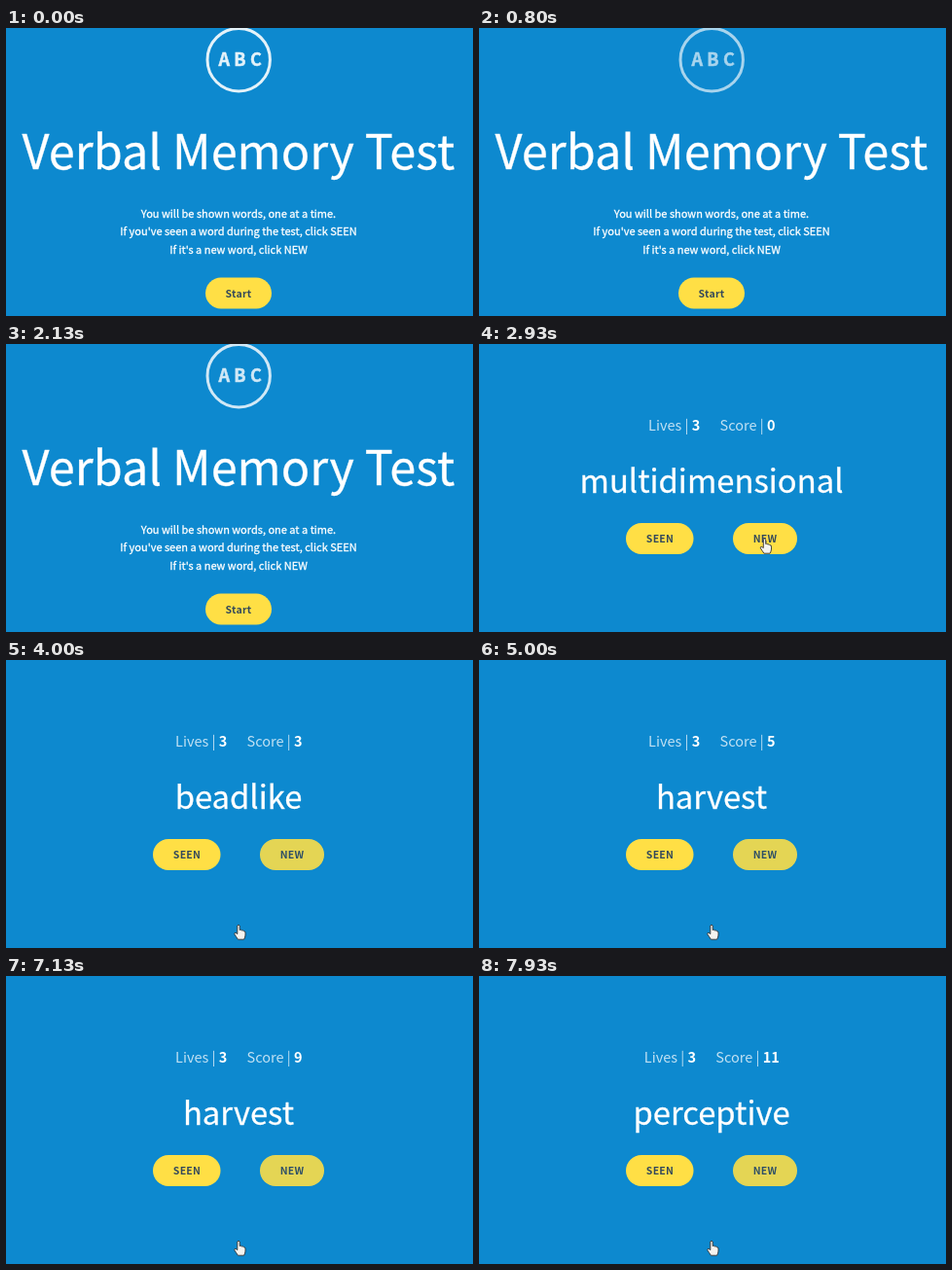
Animation of 480 by 296 pixels, one loop 8 s. Source, as an HTML page:

```html
<!DOCTYPE html>
<html lang="en">
<head>
<meta charset="utf-8">
<title>Verbal Memory Test</title>
<style>
  html, body { margin: 0; width: 100%; height: 100%; overflow: hidden; background: #0d89cf; }
  svg { display: block; width: 480px; height: 296px; }
  text {
    font-family: "Noto Sans CJK JP", "Noto Sans CJK SC", "Noto Sans CJK", "Open Sans", sans-serif;
    fill: #fff; stroke: #fff; stroke-width: 0; text-anchor: middle; white-space: pre;
  }
  .title { font-size: 48.7px; stroke-width: .3px; }
  .line { font-size: 11px; stroke-width: .3px; }
  .word { font-size: 32.8px; stroke-width: .3px; }
  .stats { font-size: 14.5px; font-weight: 300; fill-opacity: .75; }
  .stats .num { font-weight: 700; fill-opacity: 1; }
  .icon text { font-size: 18px; font-weight: 700; stroke-width: .5px; }
  .icon circle { fill: none; stroke: #fff; stroke-width: 3; }
  .btn rect { fill: #ffdf45; }
  .btn text { font-size: 10.5px; letter-spacing: .25px; font-weight: 700; fill: #34495a; }
</style>
</head>
<body>
<svg viewBox="0 0 480 296">
  <rect width="480" height="296" fill="#0d89cf"/>
  <g id="intro">
    <g class="icon" id="icon">
      <circle cx="239.2" cy="32.7" r="32.2"/>
      <text x="224.2" y="39.3">A</text>
      <text x="240.5" y="39.3">B</text>
      <text x="256.8" y="39.3">C</text>
    </g>
    <text class="title" x="239" y="144.5">Verbal Memory Test</text>
    <text class="line" x="239" y="195">You will be shown words, one at a time.</text>
    <text class="line" x="239" y="213">If you've seen a word during the test, click SEEN</text>
    <text class="line" x="239" y="231.5">If it's a new word, click NEW</text>
    <g class="btn">
      <rect x="205" y="256.5" width="68" height="32" rx="16"/>
      <text x="239" y="276.5">Start</text>
    </g>
  </g>
  <g id="game">
    <text class="stats" x="239.3" y="89">Lives | <tspan class="num">3</tspan><tspan dx="20.3">Score | </tspan><tspan class="num" id="score">0</tspan></text>
    <text class="word" id="word" x="239" y="152.8"></text>
    <g class="btn" id="seen">
      <rect x="151" y="184" width="69.5" height="32" rx="16"/>
      <text x="186" y="204.2">SEEN</text>
    </g>
    <g class="btn" id="fresh">
      <rect x="261" y="184" width="66" height="32" rx="16"/>
      <text x="294" y="204.2">NEW</text>
    </g>
  </g>
  <path id="hand" fill="#f4f4f0" stroke="#333" stroke-width=".9" stroke-linejoin="round"
    d="M-1.2 1Q0-.8 1.2 1V5.5Q2.5 4.6 3.4 6Q4.8 5.3 5.5 6.8Q7 6.5 7 8.2V11Q6.8 13 5.6 15.2H-.6Q-2.4 12.4-4.2 9.8Q-4.4 8-2.8 8.4L-1.2 9.6Z"/>
</svg>
<script>
  const LOOP = 8000, START = 2530, POINTER_IN = 2470, PULSE = 1800;
  const REST = [239, 272], SEEN = [186, 200], NEW = [293.5, 200];

  // Each answer: time, button, next word, pointer time on the button
  const answers = [
    [3000, NEW, "beadlike", 130],
    [3530, NEW, "velvet", 65],
    [4000, NEW, "beadlike", 0],
    [4465, SEEN, "lantern", 65],
    [4870, NEW, "harvest", 0],
    [5530, NEW, "velvet", 65],
    [6065, SEEN, "sunset", 65],
    [6530, NEW, "convergence", 65],
    [7000, NEW, "harvest", 0],
    [7465, SEEN, "marble", 65],
    [7870, NEW, "perceptive", 0]
  ];

  const $ = id => document.getElementById(id);
  const show = (id, on) => $(id).setAttribute("visibility", on ? "visible" : "hidden");
  const clamp = v => Math.max(0, Math.min(1, v));

  // Pressed look holds briefly, then fades out
  function press(id, button, t) {
    const last = answers.filter(a => a[1] === button && a[0] <= t).pop();
    const dim = last ? clamp(1 - (t - last[0] - 160) / 160) : 0;
    $(id).setAttribute("opacity", 1 - 0.11 * dim);
  }

  function draw(t) {
    const playing = t >= START;
    show("intro", !playing);
    show("game", playing);
    show("hand", t >= POINTER_IN);
    $("icon").setAttribute("opacity", 0.76 + 0.13 * Math.cos(t * 2 * Math.PI / PULSE));

    const done = answers.filter(a => a[0] <= t);
    const word = done.length ? done[done.length - 1][2] : "multidimensional";
    if ($("word").textContent !== word) $("word").textContent = word;
    const score = String(done.length);
    if ($("score").textContent !== score) $("score").textContent = score;
    press("seen", SEEN, t);
    press("fresh", NEW, t);

    const hover = answers.find(([at, , , lead]) => t >= at - lead && t < at);
    $("hand").setAttribute("transform", `translate(${hover ? hover[1] : REST})`);
  }

  const begin = performance.now();
  function tick() {
    draw((performance.now() - begin) % LOOP);
    requestAnimationFrame(tick);
  }
  tick();
</script>
</body>
</html>
```
